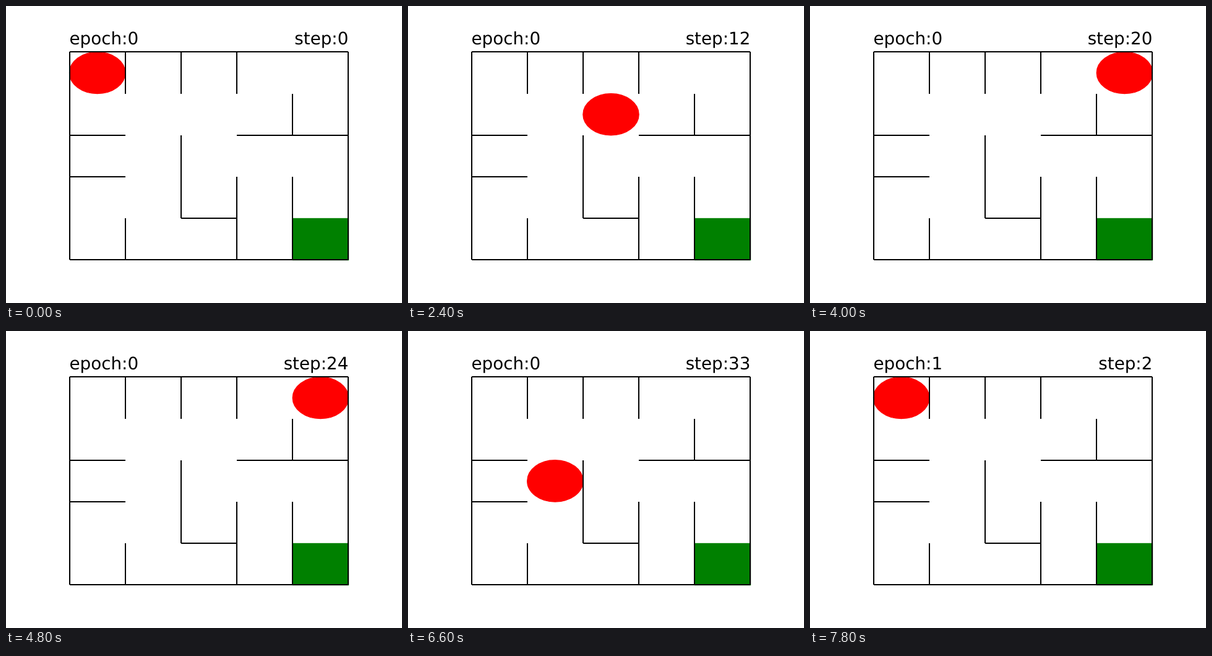
Write an HTML page that moves like this. It is 640 px wide and 480 px high and loops after 8 s.

```html
<!DOCTYPE html>
<html lang="en">
<head>
<meta charset="utf-8">
<title>Maze walk</title>
<style>
  html, body { margin: 0; width: 100%; height: 100%; overflow: hidden; background: #fff; }
  svg { display: block; width: 640px; height: 480px; }
  text { font: 27.78px "DejaVu Sans", sans-serif; text-rendering: geometricPrecision; }
</style>
</head>
<body>
<svg viewBox="0 0 640 480">
  <rect width="640" height="480" fill="#fff"/>
  <rect x="463.5" y="343.5" width="90" height="67" fill="#008000" stroke="#008000" stroke-width="1.39"/>
  <ellipse id="ball" rx="45.09" ry="33.6" fill="#f00" stroke="#f00" stroke-width="1.39"/>
  <path id="walls" fill="none" stroke="#000" stroke-width="2"/>
  <text id="epoch" x="102.5" y="62"></text>
  <text id="step" x="553.4" y="62" text-anchor="end"></text>
</svg>
<script>
const STEP = 200, LOOP = 8000, EPOCH_STEPS = 37;
const SIZE = 5, LEFT = 102.545, TOP = 74.4, CELL_W = 90.182, CELL_H = 67.2;
const $ = id => document.getElementById(id);
const ball = $('ball'), epoch = $('epoch'), step = $('step');

// "_" is a floor below a cell, "|" a wall between two cells
const maze = [
  ' | | |   ',
  '_     _|_',
  '_  |     ',
  '   |_| | ',
  ' |   | | '
];

const line = (x1, y1, x2, y2) => {
  const point = (x, y) => Math.round(LEFT + x * CELL_W) + ' ' + Math.round(TOP + y * CELL_H);
  return `M${point(x1, y1)}L${point(x2, y2)}`;
};

function drawWalls() {
  let d = '';
  for (const edge of [0, SIZE]) d += line(0, edge, SIZE, edge) + line(edge, 0, edge, SIZE);
  maze.forEach((row, y) => [...row].forEach((ch, i) => {
    const x = i >> 1;
    if (ch === '_') d += line(x, y + 1, x + 1, y + 1);
    if (ch === '|') d += line(x + 1, y, x + 1, y + 1);
  }));
  $('walls').setAttribute('d', d);
}

const isOpen = ([x, y], dx, dy) => dx
  ? maze[y][2 * x + dx] === ' '
  : !!maze[y + dy] && maze[Math.min(y, y + dy)][2 * x] === ' ';

// The maze has no loops, so there is one way between any two cells
function route(from, to, prev) {
  if (String(from) === String(to)) return [from];
  for (const [dx, dy] of [[1, 0], [-1, 0], [0, 1], [0, -1]]) {
    const next = [from[0] + dx, from[1] + dy];
    if (String(next) === String(prev) || !isOpen(from, dx, dy)) continue;
    const rest = route(next, to, from);
    if (rest) return [from, ...rest];
  }
  return null;
}

// Key cells of the walk; the ball takes the open way between them
const stops = [
  { at: 0, cell: [0, 0] }, { at: 6, cell: [0, 1] }, { at: 12, cell: [2, 1] },
  { at: 17, cell: [3, 1] }, { at: 20, cell: [4, 0] }, { at: 22, cell: [4, 1] },
  { at: 24, cell: [4, 0] }, { at: 28, cell: [2, 2] }, { at: 33, cell: [1, 2] },
  { at: 36, cell: [0, 1] }
];

function cellAt(n) {
  const i = stops.findIndex((s, k) => k > 0 && n <= s.at);
  const a = stops[i - 1], b = stops[i];
  const path = route(a.cell, b.cell);
  return path[Math.round((n - a.at) / (b.at - a.at) * (path.length - 1))];
}

function render(ms) {
  const count = Math.floor((ms % LOOP) / STEP), n = count % EPOCH_STEPS;
  const [x, y] = cellAt(n);
  ball.setAttribute('cx', LEFT + (x + 0.5) * CELL_W);
  ball.setAttribute('cy', TOP + (y + 0.5) * CELL_H);
  epoch.textContent = 'epoch:' + Math.floor(count / EPOCH_STEPS);
  step.textContent = 'step:' + n;
}

drawWalls();
const start = performance.now();
function tick() {
  render(performance.now() - start);
  requestAnimationFrame(tick);
}
tick();
</script>
</body>
</html>
```
